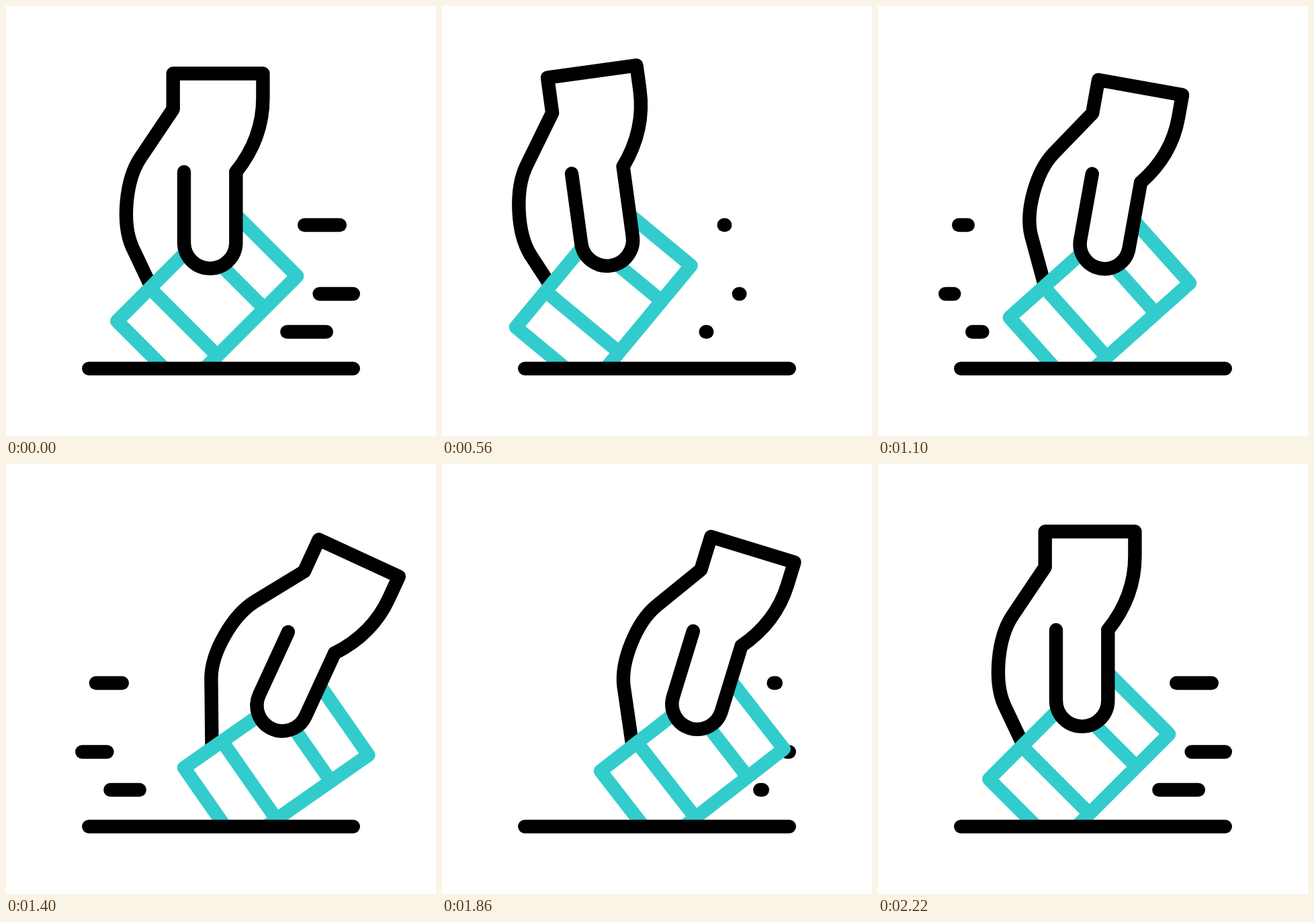
These frames come from a looping animation (640x640 px, 2400 ms). An HTML page with a canvas:

```html
<!DOCTYPE html>
<html lang="en">
<head>
<meta charset="utf-8">
<title>Sanding hand</title>
<style>
html, body { margin: 0; height: 100%; overflow: hidden; background: #fff; }
canvas { display: block; }
</style>
</head>
<body>
<canvas id="stage" width="640" height="640"></canvas>
<script>
const ctx = document.getElementById('stage').getContext('2d');
const LOOP = 2400, STEP = 20;
const INK = '#000', TEAL = '#33cccc';

// Each pose: angle in degrees, then the place of the part's own origin.
const HAND = [[0, 265, 247], [-8, 190.9, 249.5], [28.3, 446.6, 250]];
const CARD = [[0, 165.2, 469], [-5.5, 108.4, 478.3], [11.9, 283.2, 449]];

// Speed lines: y, length, right end, drift to the left, left end
const DASHES = [
  [326, 52.6, 496.8, 77.8, 120.2],
  [428.5, 50.2, 516.8, 75.6, 100.2],
  [485, 58.5, 476.8, 84.9, 140.2]
];

const mix = (a, b, p) => a + (b - a) * p;

function ease(t, from, to) {
  const u = Math.min(1, Math.max(0, (t - from) / (to - from)));
  return u * u * (3 - 2 * u);
}

function matrix([deg, x, y]) {
  const a = deg * Math.PI / 180, c = Math.cos(a), s = Math.sin(a);
  return [c, s, -s, c, x, y];
}

// Blending matrices moves every point on a straight line between poses.
function pose(poses, t) {
  const [rest, left, right] = poses.map(matrix);
  const [a, b, p] =
    t < 600 ? [rest, left, ease(t, 200, 600)] :
    t < 1600 ? [left, right, ease(t, 600, 1600)] :
    [right, rest, ease(t, 1600, 2200)];
  return a.map((v, i) => mix(v, b[i], p));
}

// The path is transformed, the line weight is not.
function shape(m, color, trace) {
  ctx.setTransform(...m);
  ctx.beginPath();
  trace();
  ctx.resetTransform();
  ctx.fillStyle = '#fff';
  ctx.fill();
  ctx.strokeStyle = color;
  ctx.stroke();
}

function line(x1, x2, y) {
  if (x2 - x1 < 0.01) return;
  ctx.strokeStyle = INK;
  ctx.beginPath();
  ctx.moveTo(x1, y);
  ctx.lineTo(x2, y);
  ctx.stroke();
}

function dashes(t) {
  for (const [y, len, right, drift, left] of DASHES) {
    if (t < 600) {
      const p = ease(t, 200, 600), end = right - drift;
      line(mix(right - len, end, p), mix(right, end, p), y);
    } else if (t < 1600) {
      line(left + len * ease(t, 1300, 1600), left + len * ease(t, 1000, 1300), y);
    } else {
      line(right - len * ease(t, 1800, 2200), right, y);
    }
  }
}

// Hand coordinates start at the tip of the thumb line.
function arm() {
  ctx.moveTo(-33, 205);
  ctx.lineTo(-77, 112);
  ctx.bezierCurveTo(-93, 76, -87, 12, -65, -21);
  ctx.lineTo(-16.3, -93.5);
  ctx.lineTo(-16.3, -146.5);
  ctx.lineTo(117.4, -146.5);
  ctx.lineTo(117.4, -110);
  ctx.bezierCurveTo(117.4, -70, 103, -32, 77.3, 0);
}

function thumb() {
  ctx.moveTo(0, 0);
  ctx.lineTo(0, 105);
  ctx.arc(38.65, 105, 38.65, Math.PI, 0, true);
  ctx.lineTo(77.3, 0);
}

// Card coordinates start at its left corner.
function card() {
  ctx.moveTo(0, 0);
  ctx.lineTo(167.5, -167.5);
  ctx.lineTo(268, -67);
  ctx.lineTo(100.5, 100.5);
  ctx.closePath();
  for (const d of [49, 119]) {
    ctx.moveTo(d, -d);
    ctx.lineTo(d + 100.5, 100.5 - d);
  }
}

function draw(t) {
  ctx.resetTransform();
  ctx.fillStyle = '#fff';
  ctx.fillRect(0, 0, 640, 640);
  ctx.lineWidth = 20.4;
  ctx.lineCap = ctx.lineJoin = 'round';
  const hand = pose(HAND, t);

  dashes(t);
  ctx.save();
  ctx.beginPath();
  ctx.rect(0, 0, 640, 539);
  ctx.clip();
  shape(hand, INK, arm);
  shape(pose(CARD, t), TEAL, card);
  shape(hand, INK, thumb);
  ctx.restore();
  line(123.2, 516.8, 539.6);
}

function tick() {
  const t = performance.now() % LOOP;
  draw(Math.floor(t / STEP) * STEP);
  requestAnimationFrame(tick);
}
tick();
</script>
</body>
</html>
```
